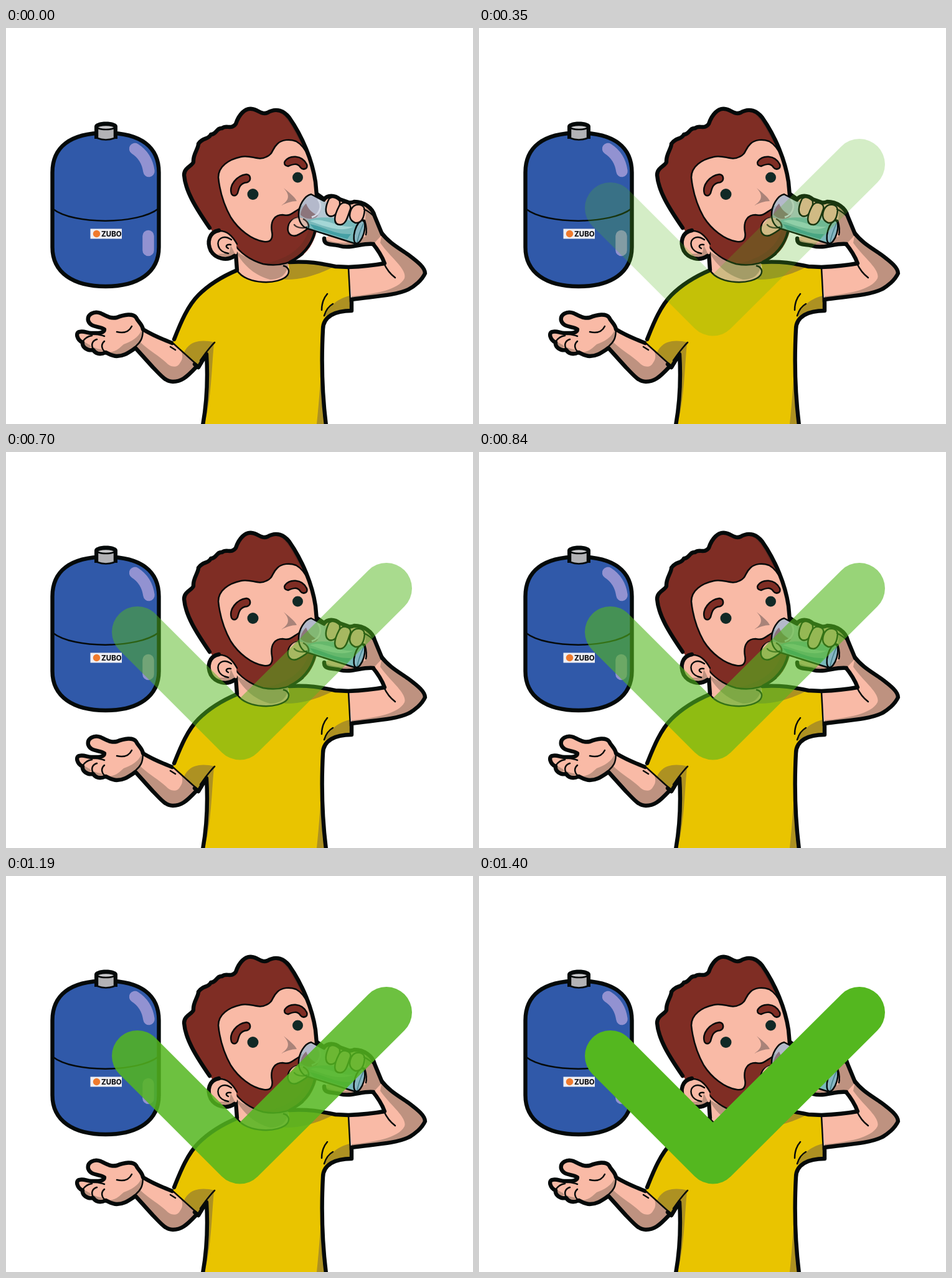
An HTML page that plays this animation: 750 by 636 pixels, repeating every 1470 ms.

```html
<!DOCTYPE html>
<html lang="en">
<head>
<meta charset="utf-8">
<title>Drinking water</title>
<style>
  html, body { margin: 0; width: 100%; height: 100%; overflow: hidden; background: #fff; }
  svg { display: block; width: 750px; height: 636px; }
  .skin { fill: #f9baa6; }
  .dim { fill: #be9280; }
  .hair { fill: #7f2d24; }
  .shirt { fill: #e9c400; }
  .fold { fill: #ad9122; }
  .thick, .thin { stroke: #050a0a; stroke-linecap: round; stroke-linejoin: round; }
  .thick { stroke-width: 6.4; }
  .thin { stroke-width: 2.5; }
  .line { fill: none; }
  .shine { stroke: #9292d1; fill: none; stroke-linecap: round; stroke-width: 18.5; }
  .brand { font: 800 11.5px Inter, "Open Sans", sans-serif; fill: #15171c; }
</style>
</head>
<body>
<svg viewBox="0 0 750 636">
  <g id="tank">
    <path class="thick" fill="#3059a9" d="M74.5 232C74.5 192 102 168.500 160 168.500S245.500 192 245.500 232V352C245.500 393 212 415 160 415S74.500 393 74.500 352Z"/>
    <path class="thin line" d="M76 291C108 316 212 316 245 290"/>
    <path class="shine" d="M207 194Q226 206 229.500 230"/>
    <path class="shine" d="M228.500 334V357"/>
    <path fill="#050a0a" d="M142 158C142 148 179 148 179 158V178H142Z"/>
    <path class="thin" fill="#b3b3b6" d="M147 160V177Q160 182 174 177V160Z"/>
    <ellipse class="thin" fill="#c9c9cb" cx="160.500" cy="159.500" rx="13.500" ry="3.500"/>
    <path fill="#efeff4" d="M135.500 322.500H186V338.500H135.500Z"/>
    <circle cx="145.500" cy="330.500" r="5.700" fill="#ef7a2d"/>
    <text class="brand" x="153" y="334.600">ZUBO</text>
  </g>

  <g id="leftArm">
    <path class="skin" d="M208 514C197 521 190 527 178 527C170 527 165 523 160 521C150 526 143 522 140 517C130 519 122 512 123 505C114 501 111 489 118 488C125 486 130 490 137 490C146 490 158 491 158 484C150 478 136 482 132 470C130 460 141 454 152 458C162 463 168 467 178 465C190 460 204 458 209 465C212 472 219 476 220 484C238 495 252 500 268 506L310 543C292 559 284 568 268 568C256 568 248 557 236 545Z"/>
    <path class="dim" d="M208 514L216 505C230 518 248 528 260 540C268 546 276 545 280 537C286 529 282 521 281 517L309 543C292 559 284 567 268 567C256 567 248 557 236 545Z"/>
    <path class="dim" d="M161 521C176 521 181 515 189 508C201 504 214 496 217 486C221 502 211 510 206 513C194 522 185 531 161 521ZM139 512C150 517 152 515 156 518L145 522ZM122 501C130 508 134 507 137 512L130 515Z"/>
    <path class="thin line" d="M136 491C144 492 151 492 158 495M123 504C127 497 132 495 138 494M140 516C136 508 139 502 146 500M161 521C153 517 152 508 158 503M178 488C190 491 198 487 202 479M219 480C222 499 214 507 206 513M264 512L272 517"/>
    <path class="thick line" d="M305 545C289 562 281 568 268 568C256 568 248 557 236 545L208 514C197 521 190 527 178 527C170 527 165 523 160 521C150 526 143 522 140 517C130 519 122 512 123 505C114 501 111 489 118 488C125 486 130 490 137 490C146 490 158 491 158 484C150 478 136 482 132 470C130 460 141 454 152 458C162 463 168 467 178 465C190 460 204 458 209 465C212 472 219 476 220 484C238 495 252 500 267 506"/>
  </g>

  <g id="rightArm">
    <path class="skin" d="M550 385C575 383 592 381 608 378C604 367 598 357 590 347L603 329C615 345 632 354 646 364C662 376 673 385 673 394C668 405 656 415 646 420C625 430 590 431 555 436Z"/>
    <path class="dim" d="M604 329C615 345 632 354 646 364C662 376 673 385 673 394C668 405 656 415 646 420C625 430 590 431 555 436V431C592 427 630 421 640 402C645 388 616 367 601 345Z"/>
    <path class="thin line" d="M607 378C611 387 617 395 625 401"/>
  </g>

  <g id="torso">
    <path class="skin" d="M365 350L371 390C382 411 440 413 451 398L456 370Z"/>
    <path class="dim" d="M369 358C378 377 397 397 424 404C440 404 452 397 454 376C420 385 385 370 369 358Z"/>
    <path class="shirt" d="M371 389C385 413 440 413 452 397C456 391 454 384 453 376C494 374 514 380 529 383L550 385L553 454C528 454 509 463 509 484C506 540 508 590 514 636H317C323 599 324 558 322 524L309 543L268 506C280 474 292 446 309 429C325 413 345 400 371 389Z"/>
    <path class="fold" d="M447 404C479 405 505 394 528 383C504 377 477 375 454 377C456 389 454 395 447 404Z"/>
    <path class="fold" d="M286 521C292 507 307 498 335 505L309 543Z"/>
    <path class="fold" d="M334 506C330 548 330 593 319 636H317C323 599 324 558 322 524Z"/>
    <path class="fold" d="M508 490C507 540 504 590 499 636H514C508 590 507 540 508 490Z"/>
    <path class="fold" d="M552 430L553 454C529 454 517 459 510 465C520 443 536 434 552 430Z"/>
    <path class="thin line" d="M371 389C385 413 440 413 452 397C456 391 454 384 446 382M268 506L309 543M335 505C326 514 319 524 312 534M516 427C509 435 507 444 507 453M525 443C518 447 514 452 511 462M550 385L553 440"/>
    <path class="thick line" d="M270 500C281 472 292 446 309 429C325 413 345 400 371 389L369 362M303 540L309 545L318 530M322 524C324 558 323 599 316 638M455 376C493 374 513 380 529 383L550 384C575 383 592 381 608 378C604 367 598 357 588 345M603 329C615 345 632 354 646 364C662 376 673 385 673 394C668 405 656 415 646 420C625 430 590 431 555 436L555 454C529 454 509 463 509 484C506 540 508 590 514 638"/>
  </g>

  <g id="head">
    <path class="hair" d="M331 326C308 293 288 262 286 236C286 224 300 221 301 215C300 203 309 194 309 186C316 175 325 180 329 171C338 171 338 160 347 161C354 155 362 164 369 154C374 139 384 128 395 130C405 131 410 140 420 136C435 127 447 134 455 144C476 174 492 213 497 247L499 327C486 374 451 384 413 379C389 372 375 360 364 344Z"/>
    <path fill="#682a23" d="M438 134C447 132 457 146 464 158L479 190C465 178 463 153 438 134Z"/>
    <path fill="#732c22" d="M497 318C492 363 450 384 413 379C460 370 480 347 486 324Z"/>
    <path class="thin skin" d="M497 247C494 230 490 215 486 207C481 195 475 187 466 182C456 178 443 179 436 186C426 195 430 202 418 207C405 214 393 203 377 207C358 211 341 222 341 240C344 269 352 288 361 304C373 323 394 340 414 343C426 345 429 337 427 327C424 308 433 300 444 300C456 303 460 297 470 291L499 270Z"/>
    <path fill="#a98379" d="M446 257C454 264 463 270 467 278C458 278 451 281 442 285C453 278 458 270 446 257Z"/>
    <path class="thin hair" d="M362 266C358 253 370 237 386 235C394 236 394 246 387 248C375 249 374 258 372 265C369 271 364 270 362 266Z"/>
    <path class="thin hair" d="M448 214C455 204 475 203 483 219C486 226 477 229 473 224C468 216 460 219 453 222C447 221 446 217 448 214Z"/>
    <circle cx="396.500" cy="267" r="9" fill="#112926"/>
    <circle cx="468.500" cy="240" r="8.500" fill="#112926"/>
    <path class="thin line" d="M364 344C375 360 389 372 413 379C440 384 462 376 477 363"/>
    <path class="thick line" d="M327 321C305 289 288 262 286 236C286 224 300 221 301 215C300 203 309 194 309 186C316 175 325 180 329 171C338 171 338 160 347 161C354 155 362 164 369 154C374 139 384 128 395 130C405 131 410 140 420 136C435 127 447 134 455 144C476 174 492 213 497 247L499 269"/>
    <path class="line" stroke="#050a0a" stroke-width="4" d="M496 327C491 349 475 367 455 376"/>
    <path class="skin" d="M371 362C359 373 338 371 329 358C322 344 326 328 342 325C354 324 363 332 370 346Z"/>
    <path class="dim" d="M368 363C358 368 348 368 340 363C347 362 355 363 359 360L361 349Z"/>
    <path class="thin line" d="M342 326C354 325 364 334 371 347M362 340C349 331 338 339 341 350C343 357 350 361 357 362M361 348C354 347 351 351 357 354"/>
    <path class="thick line" d="M367 366C354 375 336 370 329 358C322 344 326 328 342 325"/>
  </g>

  <g id="drink">
    <path class="skin" d="M509 279C513 268 526 268 536 275C546 277 551 282 559 279C575 279 589 290 592 302L605 331L590 347C574 346 561 353 542 351C529 348 511 351 511 338L529 328Z"/>
    <path class="dim" d="M578 287C591 294 595 306 605 331L590 347C564 348 554 354 536 350C517 349 510 346 511 338C532 349 560 346 578 334C583 326 579 320 577 311Z"/>
    <path class="thin skin" d="M478 307C466 301 455 309 453 319C451 330 458 336 467 333C474 330 481 325 486 321Z"/>
    <path fill="#a9bfcc" fill-opacity=".86" d="M490 267C480 269 469 285 470 302C471 313 477 320 484 322L560 346C570 347 579 319 575 309Z"/>
    <path fill="#78b9bb" d="M486 309C507 298 549 309 575 313C577 327 569 346 559 345L483 321C475 318 472 313 472 306Z"/>
    <path fill="#a4d6d6" d="M488 310C511 303 532 321 558 319C539 329 511 319 488 310Z"/>
    <path fill="#45a0a5" d="M488 315C511 319 526 332 554 331L548 339L495 323Z"/>
    <path fill="#b4b9cb" d="M474 299C475 281 484 268 495 270C507 273 510 291 502 301C493 310 480 308 474 299Z"/>
    <path fill="#85696f" fill-opacity=".85" d="M473 300C474 292 477 286 482 282C485 291 493 298 501 301C493 309 481 308 473 300Z"/>
    <path fill="none" stroke="#d3d9e6" stroke-width="3" d="M501 275C509 286 504 300 491 304"/>
    <path class="skin" fill-opacity=".75" d="M475 305C466 302 457 308 455 317C463 323 478 321 486 317C486 310 482 306 475 305Z"/>
    <path class="thin line" d="M478 307C482 309 487 314 486 320M463 316C467 321 476 322 483 320" stroke-opacity=".75"/>
    <ellipse class="thin" cx="567.500" cy="327.500" rx="7.500" ry="19" transform="rotate(16 567.500 327.500)" fill="#87b6c2"/>
    <path fill="none" stroke="#437f89" stroke-width="1.500" d="M564 344C566 333 570 323 574 314"/>
    <path class="thin line" d="M490 267C480 269 469 285 470 302C471 313 477 320 484 322L560 346M490 267L511 278M563 305L575 309"/>
    <path class="thin skin" d="M519 274C528 268 540 274 535 287C532 298 527 304 519 302C511 298 513 286 519 274Z"/>
    <path class="thin skin" d="M535 286C541 276 556 281 553 291C549 301 547 315 537 316C525 316 526 303 535 286Z"/>
    <path class="thin skin" d="M555 290C561 280 575 283 576 292C575 305 571 314 561 313C551 309 550 300 555 290Z"/>
    <path class="thin line" d="M575 291C583 295 588 299 592 304M578 332C580 325 579 319 576 309"/>
    <path class="thick line" d="M500 267L511 275C516 268 528 268 536 275C546 278 551 283 559 279C575 279 589 289 592 302L604 331M511 338C510 350 526 347 536 350C555 355 571 345 590 347"/>
  </g>

  <path id="check" d="M211 289L375.500 453.500L611 219" fill="none" stroke="#54b71f" stroke-width="82" stroke-linecap="round" stroke-linejoin="round" opacity="0"/>
</svg>
<script>
  const LOOP = 1470, STEP = 70, LAST = LOOP / STEP - 1;
  const check = document.getElementById("check");
  const start = performance.now();

  // The tick fades in by equal steps, then vanishes at once.
  function draw(ms) {
    check.setAttribute("opacity", Math.floor(ms % LOOP / STEP) / LAST);
  }

  function tick(now) {
    draw(Math.max(0, now - start));
    requestAnimationFrame(tick);
  }

  draw(0);
  requestAnimationFrame(tick);
</script>
</body>
</html>
```
